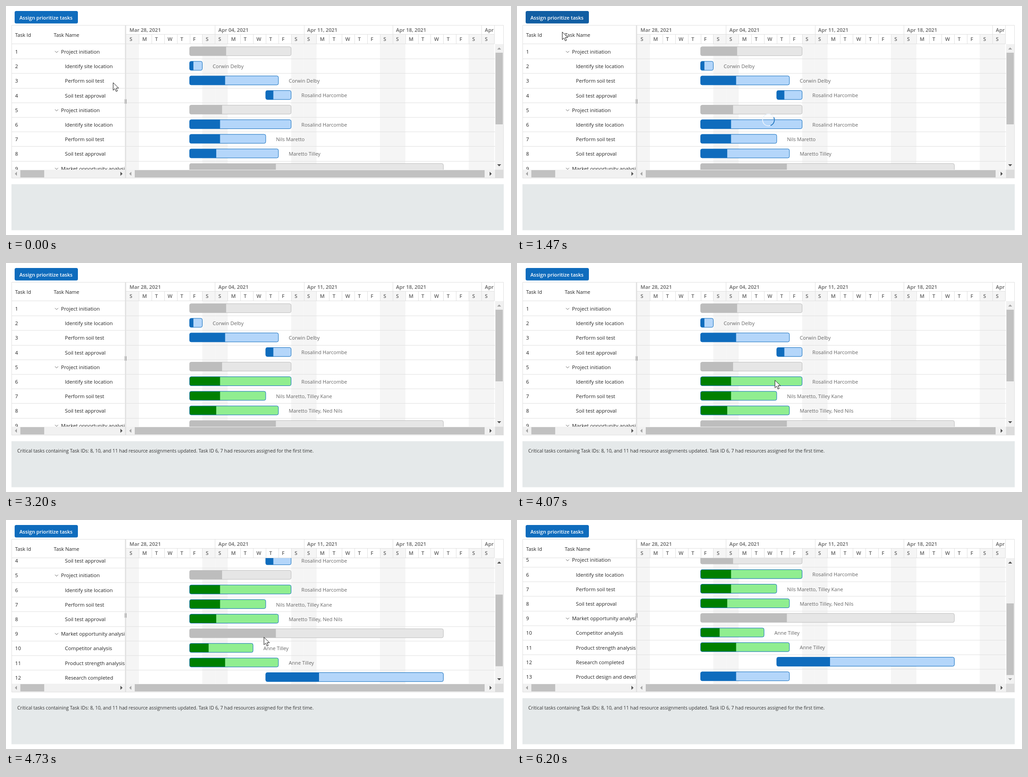
Recreate the animation shown at these times as an HTML page. Size 1110x505 px, loop 6.94 s.

```html
<!DOCTYPE html>
<html lang="en">
<head>
<meta charset="utf-8">
<title>Assign prioritize tasks</title>
<style>
  html, body { margin: 0; width: 100%; height: 100%; overflow: hidden; background: #fff; }
  svg { display: block; font: 11.2px "Open Sans", "Noto Sans", sans-serif; fill: #242424; }
  .head { font-weight: 600; fill: #616161; }
  .label { font-size: 11px; fill: #666; }
  .message { font-size: 10.32px; fill: #333; }
  .button { font-size: 11.1px; font-weight: 600; fill: #fff; }
  .line { stroke: #e0e0e0; fill: none; }
  .rest { fill: #b4d6fa; }
  .progress { fill: #0f6cbd; }
  .edge { fill: none; stroke: #0f6cbd; }
  .parent .rest { fill: #e6e6e6; }
  .parent .progress { fill: #bdbdbd; }
  .parent .edge { stroke: #bdbdbd; }
  .done .critical .rest { fill: #90ee90; }
  .done .critical .progress { fill: #008000; }
</style>
</head>
<body>
<script>
const LOOP = 6940, TICK = 1000 / 15;
const DAY = 27.89, LEFT = 264.1, START = LEFT + 5 * DAY;
const TOP = 84, BOTTOM = 361, ROW = 32.2;

const NS = 'http://www.w3.org/2000/svg';
function add(parent, tag, attrs = {}, content = '') {
  const el = document.createElementNS(NS, tag);
  for (const key in attrs) el.setAttribute(key, attrs[key]);
  if (content) el.textContent = content;
  parent.appendChild(el);
  return el;
}
const rect = (parent, x, y, width, height, fill, more) =>
  add(parent, 'rect', { x, y, width, height, fill, ...more });
const text = (parent, x, y, content, cls = '') =>
  add(parent, 'text', { x, y, class: cls }, content);
const line = (parent, d) => add(parent, 'path', { d, class: 'line' });
const show = (el, on) => el.setAttribute('visibility', on ? 'visible' : 'hidden');

const svg = add(document.body, 'svg', { width: 1110, height: 505, viewBox: '0 0 1110 505' });
const defs = add(svg, 'defs');
function clip(id, x, y, w, h) {
  rect(add(defs, 'clipPath', { id }), x, y, w, h);
  return { 'clip-path': `url(#${id})` };
}

// Button
const button = rect(svg, 19, 11, 139, 27.5, '#0f6cbd', { rx: 3.5 });
text(svg, 29.5, 29.5, 'Assign prioritize tasks', 'button');

// Weekends and timeline header
for (let d = 0; d < 29; d++) {
  if (d % 7 === 0 || d % 7 === 6) rect(svg, LEFT + d * DAY, 63, DAY + .1, BOTTOM - 63, '#f5f5f5');
}
const header = add(svg, 'g', clip('header', LEFT, 42, 809.5, 42));
['Mar 28', 'Apr 04', 'Apr 11', 'Apr 18', 'Apr 25'].forEach((week, i) => {
  const x = LEFT + i * 7 * DAY;
  text(header, x + 7.5, 57, week + ', 2021', 'head');
  if (i) line(header, `M${Math.round(x) + .5} 42V63`);
});
for (let d = 0; d < 29; d++) {
  const x = LEFT + d * DAY;
  text(header, x + 7.5, 77.3, 'SMTWTFS'[d % 7], 'head');
  if (d) line(header, `M${Math.round(x) + .5} 63V84`);
}
text(svg, 20, 67.7, 'Task Id').style.fontSize = '11px';
text(svg, 105, 67.7, 'Task Name').style.fontSize = '11px';
line(svg, 'M264 62.5H1074M1073.5 42V84');

// Task: name, first day, last day, percent, kind, resources before and after
const PARENT = 'parent', CRITICAL = 'critical';
const A = 'Corwin Delby', B = 'Rosalind Harcombe', C = 'Anne Tilley';
const tasks = [
  ['Project initiation', 0, 8, 36, PARENT],
  ['Identify site location', 0, 1, 30, '', A],
  ['Perform soil test', 0, 7, 40, '', A],
  ['Soil test approval', 6, 8, 30, '', B],
  ['Project initiation', 0, 8, 32, PARENT],
  ['Identify site location', 0, 8, 30, CRITICAL, B],
  ['Perform soil test', 0, 6, 40, CRITICAL, 'Nils Maretto', 'Nils Maretto, Tilley Kane'],
  ['Soil test approval', 0, 7, 30, CRITICAL, 'Maretto Tilley', 'Maretto Tilley, Ned Nils'],
  ['Market opportunity analysis', 0, 20, 34, PARENT],
  ['Competitor analysis', 0, 5, 30, CRITICAL, C],
  ['Product strength analysis', 0, 7, 40, CRITICAL, C],
  ['Research completed', 6, 20, 30, ''],
  ['Product design and development', 0, 7, 40, '']
];
const grid = add(add(svg, 'g', clip('grid', 12, TOP, 249.5, BOTTOM - TOP)), 'g');
const chart = add(add(svg, 'g', clip('chart', 264, TOP, 811, BOTTOM - TOP)), 'g');
const labels = [];

tasks.forEach(([name, from, to, percent, kind, before, after], i) => {
  const top = TOP + i * ROW, parent = kind === PARENT;
  const rule = Math.round(top + ROW) + .5;
  line(grid, `M12 ${rule}H262`);
  line(chart, `M264 ${rule}H1075`);
  text(grid, 20, top + 21, String(i + 1));
  text(grid, parent ? 121 : 129.5, top + 21, name);
  if (parent) {
    add(grid, 'path', { d: `M107.7 ${top + 15.3}l3.5 3.5l3.5 -3.5`, fill: 'none', stroke: '#616161' });
  }
  const x = START + from * DAY, w = (to - from) * DAY, y = top + 5.8, h = 19.8;
  const bar = add(chart, 'g', { class: kind });
  const box = { x, y, width: w, height: h, rx: 3.5 };
  add(bar, 'rect', { ...box, class: 'rest' });
  add(bar, 'path', {
    class: 'progress',
    d: `M${x + w * percent / 100} ${y}V${y + h}H${x + 3.5}q-3.5 0 -3.5 -3.5V${y + 3.5}q0 -3.5 3.5 -3.5Z`
  });
  add(bar, 'rect', { ...box, class: 'edge' });
  if (before) {
    const el = text(chart, START + to * DAY + 22.7, top + 20.8, before, 'label');
    labels.push({ el, before, after: after || before });
  }
});

// Scrollbars
const LIGHT = '#a3a3a3', DARK = '#505050', THUMB = '#c1c1c1';
const arrow = (x, y, turn, fill) => add(svg, 'path', {
  d: 'M-2.6 0L2 -4.4V4.4Z', transform: `translate(${x} ${y}) rotate(${turn})`, fill
});
rect(svg, 12, BOTTOM, 250, 18.5, '#f1f1f1');
rect(svg, 31.5, 362, 52.5, 16, THUMB);
arrow(22, 370, 0, LIGHT);
arrow(253.5, 370, 180, DARK);
rect(svg, 264, BOTTOM, 811, 18.5, '#f1f1f1');
const wideThumb = rect(svg, 283, 362, 769, 16, THUMB);
arrow(273.5, 370, 0, LIGHT);
arrow(1065, 370, 180, DARK);
rect(svg, 1075, TOP, 18, BOTTOM - TOP, '#f1f1f1');
const tallThumb = rect(svg, 1076, 103, 16, 158, THUMB);
const up = arrow(1084, 94, 90, LIGHT);
const down = arrow(1084, 351, -90, DARK);
rect(svg, 1075, BOTTOM, 19, 18.5, '#dcdcdc');

// Frame and splitter
line(svg, 'M12.5 42.5H1093.5V379.5H12.5ZM12 83.5H262M264 83.5H1074');
rect(svg, 261.5, 42, 2.6, 338, '#e0e0e0');
rect(svg, 260.8, 205, 4.4, 11, '#f5f5f5');
add(svg, 'path', { d: 'M261.7 205.5V215.5M264.3 205.5V215.5', stroke: '#757575' });

// Message
rect(svg, 12, 393, 1082, 101.5, '#e5e9ea');
const message = text(svg, 24.7, 417.6, 'Critical tasks containing Task IDs: 8, 10, and 11 had resource ' +
  'assignments updated. Task ID 6, 7 had resources assigned for the first time.', 'message');

// Spinner
const spinner = add(svg, 'g', { fill: 'none', 'stroke-width': 1.7 });
add(spinner, 'circle', { cx: 552.7, cy: 251.3, r: 13, stroke: '#ebf3fc' });
const arc = add(spinner, 'circle', {
  cx: 552.7, cy: 251.3, r: 13, stroke: '#0f6cbd', pathLength: 360, 'stroke-dasharray': '97 263'
});

// Pointers
const ink = { fill: '#fff', stroke: '#111', 'stroke-linejoin': 'round' };
const pointer = add(svg, 'path', {
  ...ink, d: 'M.5 .5V17.3L4.3 13.7L7.1 20L9.9 18.8L7.2 12.6H12.6Z'
});
const hand = add(svg, 'g', ink);
add(hand, 'path', {
  d: 'M-2 1.6Q-2 -.2 -.2 -.2Q1.6 -.2 1.6 1.6V7.8Q2.2 6.8 3.6 7Q5 7.3 5 8.7Q5.7 7.8 6.9 8.1' +
     'Q8.3 8.4 8.3 9.8Q10 9.2 10 11.5V16Q10 18.5 8.2 20.6V23H-2.8V20.8L-7.6 15.4' +
     'Q-8.7 13.7 -7.4 12.7Q-5.9 11.7 -4.4 13.2L-2 15.4Z'
});
add(hand, 'path', { d: 'M1.6 7.8V12M5 8.7V12.2M8.3 9.8V12.5', fill: 'none' });

// Pointer trips: tick, x, y
const trips = [
  [[0, 235, 168.5], [2, 235, 168.5], [4, 219, 153], [7, 162, 98], [10, 104, 43], [12, 91, 30.5],
   [20, 91, 30.5], [23, 103, 70], [26, 129, 155], [29, 163, 298], [32, 201.5, 477], [34, 220, 560]],
  [[56, 500, 438], [57, 522, 370], [59, 554, 284], [61, 566.5, 258], [83, 566.5, 258],
   [84, 561, 261], [85, 535, 277], [87, 440, 335], [88, 368, 385], [92, 73, 494], [93, 0, 520]]
];
function locate(n) {
  for (const trip of trips) {
    for (let i = 1; i < trip.length; i++) {
      const [a, ax, ay] = trip[i - 1], [b, bx, by] = trip[i];
      if (n < a || n > b) continue;
      const k = (n - a) / (b - a);
      return [ax + (bx - ax) * k, ay + (by - ay) * k];
    }
  }
  return null;
}

const latest = (steps, n) => steps.reduce((value, [at, next]) => n >= at ? next : value, 0);
const scrolls = [[68, 20], [69, 62], [70, 95], [71, 107.5], [75, 130], [76, 141.4]];

function draw(t) {
  const n = Math.floor((t + 5) / TICK);
  const at = locate(n);
  const over = (x, y, w, h) => at && at[0] >= x && at[0] <= x + w && at[1] >= y && at[1] <= y + h;
  const onButton = over(19, 11, 139, 27.5);

  const shape = onButton ? hand : pointer;
  show(hand, at && onButton);
  show(pointer, at && !onButton);
  if (at) shape.setAttribute('transform', `translate(${at})`);

  const pressed = n >= 15 && n < 19, focused = n >= 15 && n < 36;
  button.setAttribute('fill', pressed ? '#0d4a80' : onButton || focused ? '#115ea3' : '#0f6cbd');
  wideThumb.setAttribute('fill', over(283, 362, 769, 16) ? '#a8a8a8' : THUMB);

  show(spinner, n >= 20 && n < 48);
  arc.setAttribute('transform', `rotate(${158 + (n - 32) * TICK / 1300 * 360} 552.7 251.3)`);

  const done = n >= 48;
  svg.setAttribute('class', done ? 'done' : '');
  show(message, done);
  for (const { el, before, after } of labels) el.textContent = done ? after : before;

  const scroll = latest(scrolls, n);
  grid.setAttribute('transform', `translate(0 ${-scroll})`);
  chart.setAttribute('transform', `translate(0 ${-scroll})`);
  tallThumb.setAttribute('y', 103 + scroll * .572);
  up.setAttribute('fill', scroll > 0 ? DARK : LIGHT);
  down.setAttribute('fill', scroll > 141 ? LIGHT : DARK);
}

const began = performance.now();
function loop() {
  draw((performance.now() - began) % LOOP);
  requestAnimationFrame(loop);
}
loop();
</script>
</body>
</html>
```
